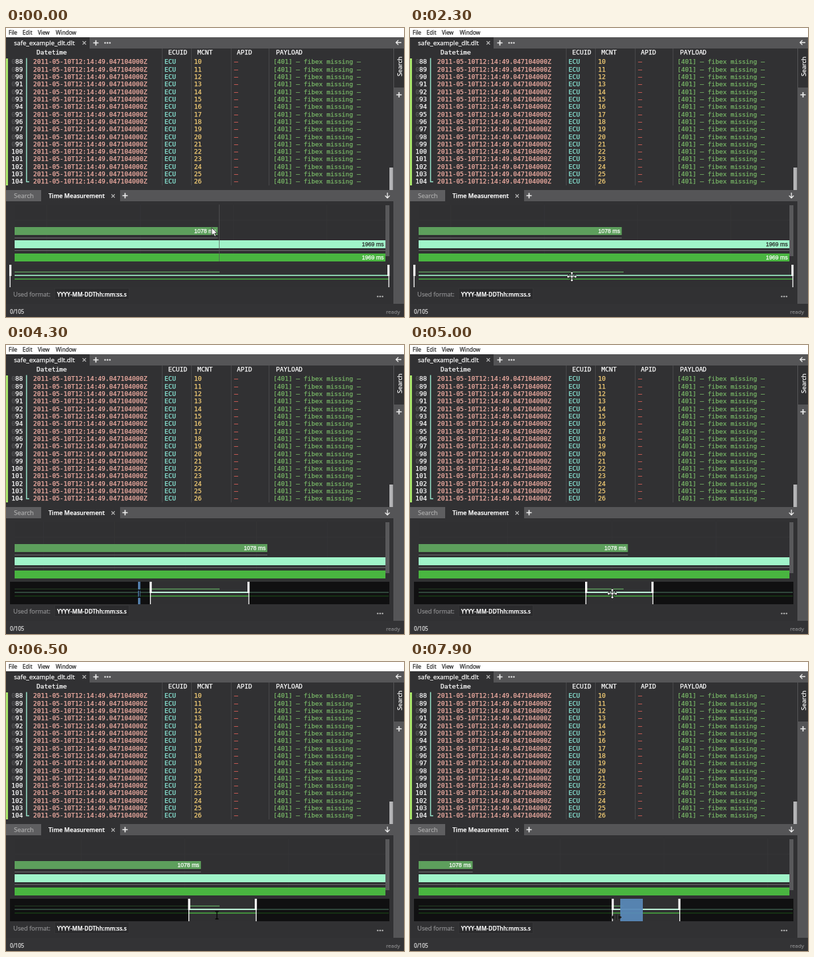
Animation of 600x437 px, one loop 8000 ms. Source, as an HTML page:

```html
<!DOCTYPE html>
<html lang="en">
<head>
<meta charset="utf-8">
<style>
html, body { margin: 0; width: 100%; height: 100%; overflow: hidden; background: #313133; }
svg { display: block; width: 600px; height: 437px; }
text { white-space: pre; font-family: "Open Sans", "Noto Sans", sans-serif; }
.mono { font: 9.52px "DejaVu Sans Mono", monospace; }
.ms { font: 8.6px "Liberation Sans", Arial, sans-serif; text-anchor: end; }
.bold { font-weight: 600; }
</style>
</head>
<body>
<svg id="stage" viewBox="0 0 600 437"></svg>
<script>
const LOOP = 8000, LEFT = 13, WIDTH = 559, ROW = 11.31;
const stage = document.getElementById('stage');
let html = '';

const rect = (x, y, w, h, fill, more = '') =>
  html += `<rect x="${x}" y="${y}" width="${w}" height="${h}" fill="${fill}" ${more}/>`;
const path = (d, stroke, width = 1, more = '') =>
  html += `<path d="${d}" stroke="${stroke}" stroke-width="${width}" fill="none" ${more}/>`;
// A hairline stroke gives the text its slightly heavy weight
const text = (x, y, s, fill, size, more = '') =>
  html += `<text x="${x}" y="${y}" fill="${fill}" stroke="${fill}" stroke-width=".25" font-size="${size}" ${more}>${s}</text>`;
const mono = (x, y, s, fill) => text(x, y, s, fill, 9.52, 'class="mono"');
const plus = (x, y) => path(`M${x - 4} ${y}h8m-4-4v8`, '#eee', 1.7);
const cross = (x, y) => path(`M${x - 2.5} ${y - 2.5}l5 5m0-5l-5 5`, '#bbb', 1.1);
const dots = (x, y, fill) => {
  for (const d of [-3.6, 0, 3.6]) html += `<circle cx="${x + d}" cy="${y}" r="1.3" fill="${fill}"/>`;
};

function drawFrame() {
  rect(0, 0, 600, 14, '#fff');
  [[4, 'File'], [25, 'Edit'], [48, 'View'], [75, 'Window']]
    .forEach(([x, s]) => text(x, 10, s, '#222', 8.2));
  rect(0, 14, 600, 17, '#555557');
  rect(0, 14, 126, 17, '#313133');
  text(12, 25.5, 'safe_example_dlt.dlt', '#fff', 9.65);
  cross(118, 22.5);
  plus(135.5, 22.5);
  dots(153, 22.5, '#ddd');

  rect(584, 14, 16, 403, '#555557');
  rect(585, 31, 15, 59, '#313133');
  path('M596 22h-8m3.5-3.5l-3.5 3.5l3.5 3.5', '#eee', 1.3);
  text(0, 0, 'Search', '#fff', 9.5, 'transform="translate(597 73) rotate(-90)"');
  plus(592.5, 101);

  rect(0, 245, 584, 17, '#555557');
  rect(0, 245, 53, 17, '#5e5e60');
  rect(53, 245, 119, 17, '#313133');
  text(12, 256.5, 'Search', '#aaa', 9.5);
  text(64, 256.5, 'Time Measurement', '#fff', 9.05, 'class="bold"');
  cross(161.5, 254);
  plus(179.5, 253.5);
  path('M575 249v8m-3.5-3.5l3.5 3.5l3.5-3.5', '#eee', 1.3);

  text(11, 405.5, 'Used format:', '#8c8c8e', 9.2);
  rect(73.5, 393.5, 112, 17, '#2b2b2d', 'stroke="#353537"');
  text(77, 405.5, 'YYYY-MM-DDThh:mm:ss.s', '#fff', 8.5, 'class="bold"');
  dots(564, 406, '#aaa');
  rect(0, 417, 600, 20, '#333335');
  text(6, 431.5, '0/105', '#ddd', 8.1);
  text(594, 431.5, 'ready', '#808082', 8, 'text-anchor="end"');
}

function drawLog() {
  [[46, 'Datetime'], [244.5, 'ECUID'], [288.5, 'MCNT'], [348, 'APID'], [407, 'PAYLOAD']]
    .forEach(([x, s]) => mono(x, 39.8, s, '#fff'));
  path('M235.5 31v207M279.5 31v207M339.5 31v207M396.5 31v207', '#48484a');
  rect(0, 46, 3, 192, '#a9e56c');
  path('M35 232.5h-4v-187', '#98e4cb', 1.5);
  for (let i = 0; i < 17; i++) {
    const y = 54.4 + i * ROW, n = 88 + i;
    if (n < 100) mono(8.3, y, '0', '#58585a');
    mono(n < 100 ? 14 : 8.3, y, n, '#fff');
    mono(41, y, '2011-05-10T12:14:49.047104000Z', '#f5b0a5');
    mono(239, y, 'ECU', '#8cecdb');
    mono(283.5, y, 10 + i, '#f6cf76');
    mono(344, y, '–', '#e2625a');
    mono(403, y, '[401] – fibex missing –', '#77b566');
  }
  rect(578, 211, 5.5, 34, '#b4b4b6');
}

function drawChart() {
  rect(LEFT, 267, WIDTH, 86, '#303032');
  path('', '#353537', 1, 'id="grid"');
  rect(LEFT, 301, 306, 12, '#5d9f5c', 'id="bar"');
  rect(LEFT, 317, 306, 1, '#6c6c6e', 'id="barRule"');
  rect(LEFT, 321, WIDTH, 12, '#a0f4c9');
  rect(LEFT, 336, WIDTH, 1, '#6c6c6e');
  rect(LEFT, 341, WIDTH, 12, '#49b540');
  text(0, 310.3, '1078 ms', '#fff', 8.6, 'class="ms" id="barLabel"');
  html += '<g id="fullLabels">';
  text(569.5, 330.3, '1969 ms', '#262626', 8.6, 'class="ms"');
  text(569.5, 350, '1969 ms', '#fff', 8.6, 'class="ms"');
  html += '</g>';
  path('M0 267v86', '#59595b', 1, 'id="hover" opacity=".7"');
  rect(572, 268, 6, 77, '#59595b');

  // Overview strip with its selection window
  rect(6, 358, 572, 34, '#303032');
  rect(LEFT, 368.3, 309, 1.4, '#5d9f5c');
  rect(LEFT, 373.3, 564, 1.6, '#a0f4c9');
  rect(LEFT, 378.9, 564, 1.4, '#49b540');
  rect(6, 358, 0, 34, '#000', 'id="shadeLeft" opacity=".66"');
  rect(0, 358, 0, 34, '#000', 'id="shadeRight" opacity=".66"');
  rect(0, 373.2, 0, 1.6, '#c8f8e1', 'id="edge"');
  html += '<g id="handleLeft">';
  rect(-1, 358, 3.2, 17, '#fff');
  rect(-0.5, 375, 1.3, 17, '#fff');
  html += '</g><g id="handleRight">';
  rect(-2, 358, 3.2, 17, '#fff');
  rect(-0.5, 375, 1.3, 17, '#fff');
  html += '</g>';
  rect(0, 358, 0, 34, '#5989b8', 'id="mark" opacity=".94"');
}

function drawCursors() {
  const outlined = (id, d, fill, edge) =>
    html += `<path id="${id}" d="${d}" fill="${fill}" stroke="${edge}" stroke-width=".9" stroke-linejoin="round"/>`;
  outlined('arrow', 'M0 0v11.5l2.7-2.5l1.9 4.3l2-.9l-1.9-4.1h3.8z', '#fff', '#222');
  outlined('move', 'M0-8l3 3.5h-2v3.5h3.5v-2l3.5 3l-3.5 3v-2h-3.5v3.5h2l-3 3.5l-3-3.5h2v-3.5h-3.5v2l-3.5-3l3.5-3v2h3.5v-3.5h-2z', '#fff', '#111');
  outlined('resize', 'M-8 0l5-4v8zM8 0l-5-4v8zM-1-5h2v10h-2z', '#151515', '#3a3a3c');
  path('M-2.5-5.5h2l.5 1l.5-1h2M0-4.5v9M-2.5 5.5h2l.5-1l.5 1h2', '#050505', 1.3, 'id="beam"');
}

drawFrame();
drawLog();
drawChart();
drawCursors();
stage.innerHTML = html;

const el = {};
stage.querySelectorAll('[id]').forEach(e => el[e.id] = e);
const set = (e, attrs) => { for (const k in attrs) e.setAttribute(k, attrs[k]); };
const show = (e, on) => set(e, { visibility: on ? 'visible' : 'hidden' });
const place = (e, x, y = 0) => set(e, { transform: `translate(${x} ${y})` });

// Flat lists of time, value pairs
const tracks = {
  x: [0, 310, 1000, 207, 1300, 207, 2200, 244, 2400, 244, 2800, 576, 3600, 366, 3900, 7, 4300, 201,
    4550, 265, 4800, 305, 5100, 305, 5650, 139, 5750, 139, 6500, 318, 6750, 345, 7400, 351, 7900, 311],
  y: [0, 302, 1000, 315, 1300, 315, 2200, 376, 5800, 376, 6500, 383, 7400, 386],
  hover: [0, 321, 1000, 205, 1300, 205, 2200, 242],
  from: [3900, 6, 4300, 217.5, 4550, 265, 5100, 265, 5650, 99, 5750, 99, 6500, 275.5, 6750, 305],
  to: [2800, 577, 3600, 366, 5100, 366, 5650, 201.5, 5750, 201.5, 6500, 377, 6750, 406.5],
  lag: [3900, 0, 4300, 3.3, 4550, 0, 5750, 0, 6500, -4.5, 6750, 2.2]
};

function at(name, t) {
  const k = tracks[name];
  if (t <= k[0]) return k[1];
  for (let i = 2; i < k.length; i += 2)
    if (t < k[i]) return k[i - 1] + (k[i + 1] - k[i - 1]) * (t - k[i - 2]) / (k[i] - k[i - 2]);
  return k[k.length - 1];
}

function cursorKind(t) {
  if (t < 1950) return 'arrow';
  if (t < 2700) return 'move';
  if (t < 4200) return 'resize';
  if (t < 4600) return 'beam';
  if (t < 6400) return 'move';
  return t < 7400 ? 'beam' : 'resize';
}

function render(t) {
  const x = at('x', t), y = at('y', t), from = at('from', t), to = at('to', t);
  const start = Math.max(LEFT, from), scale = WIDTH / (to - start);
  const chartX = m => LEFT + (m - start - at('lag', t)) * scale;

  const end = chartX(322), size = Math.max(0, Math.min(WIDTH, end - LEFT));
  set(el.bar, { width: size });
  set(el.barRule, { width: size });
  set(el.barLabel, { x: end - 2.5 });
  show(el.barLabel, end <= LEFT + WIDTH && size > 36);
  show(el.fullLabels, to > 576 && from < 7);

  const step = scale > 2 ? 28.4 : 142;
  let grid = 'M13 290.5h559';
  for (let m = 62 - 2 * 142; m < to; m += step)
    if (chartX(m) > LEFT && chartX(m) < 572) grid += `M${chartX(m)} 267v86`;
  set(el.grid, { d: grid });

  place(el.hover, Math.round(at('hover', t)) + 0.5);
  show(el.hover, y < 353);

  set(el.shadeLeft, { width: from - 6 });
  set(el.shadeRight, { x: to, width: Math.max(0, 578 - to) });
  set(el.edge, { x: from, width: from > 7 || to < 576 ? to - from : 0 });
  place(el.handleLeft, from);
  place(el.handleRight, to);

  const late = t >= 7400;
  const markX = late ? x + 6 : 199;
  set(el.mark, { x: markX, width: late ? Math.max(0, 351 - markX) : 3.5 });
  show(el.mark, late || (t >= 4200 && t < 4500));

  const kind = cursorKind(t);
  for (const k of ['arrow', 'move', 'resize', 'beam']) show(el[k], k === kind);
  place(el[kind], x, y);
}

function tick(now) {
  render(Math.floor(now % LOOP / 100) * 100);
  requestAnimationFrame(tick);
}
render(0);
requestAnimationFrame(tick);
</script>
</body>
</html>
```
